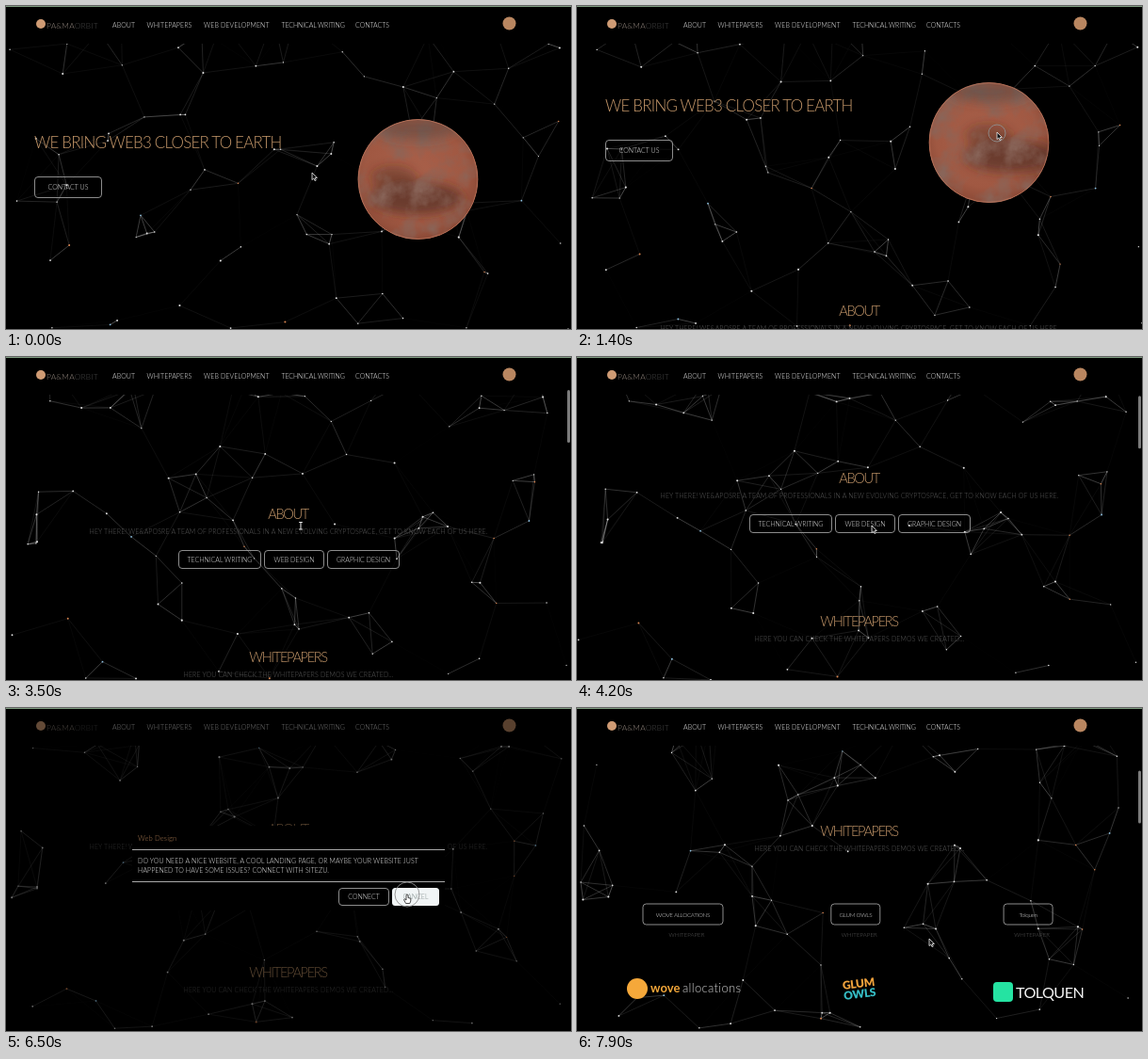
Animation of 600x343 px, one loop 8000 ms. Source, as an HTML page with a canvas:

```html
<!DOCTYPE html>
<html lang="en">
<head>
<meta charset="utf-8">
<title>Web3 landing page</title>
<style>
  html, body { margin: 0; width: 100%; height: 100%; overflow: hidden; background: #000; }
  canvas, svg { position: absolute; left: 0; top: 0; display: block; }
  text { font-family: Lato, "Open Sans", sans-serif; font-weight: 300; white-space: pre; }
  .regular { font-weight: 400; }
  .bold { font-weight: 700; }
  .heavy { font-weight: 900; }
</style>
</head>
<body>
<canvas id="net" width="600" height="343"></canvas>
<svg id="stage" width="600" height="343" viewBox="0 0 600 343"></svg>
<script>
const W = 600, H = 343, LOOP = 8000, STEP = 100;
const GOLD = '#c6986a', PALE = '#e6e6e6', DIM = '#5c5c5c';

// ---------- markup helpers ----------
const text = (x, y, str, size, fill, { anchor = 'start', gap = 0.1, cls = '' } = {}) =>
  `<text x="${x}" y="${y}" font-size="${size}" fill="${fill}" text-anchor="${anchor}" letter-spacing="${gap}" class="${cls}">${str}</text>`;
const centred = (x, y, str, size, fill, gap) => text(x, y, str, size, fill, { anchor: 'middle', gap });
const button = (x, y, w, h, label, size = 7, gap = 0) => `
  <rect x="${x + .5}" y="${y + .5}" width="${w - 1}" height="${h - 1}" rx="3.5" fill="none" stroke="#b0b0b0" stroke-width=".8"/>
  ${centred(x + w / 2, y + h / 2 + 2.5, label, size, PALE, gap)}`;
const heading = (y, str) => centred(299.5, y, str, 14.6, GOLD, -1.35);
const caption = (y, str) => centred(300, y, str, 7, DIM, .13);
const blob = (x, y, rx, ry, fill, opacity) =>
  `<ellipse cx="${x}" cy="${y}" rx="${rx}" ry="${ry}" fill="${fill}" opacity="${opacity}"/>`;

const planet = `
  <g id="planet" transform="translate(437.5 184)" clip-path="url(#disc)">
    <circle r="64" fill="url(#rust)"/>
    <g id="terrain">
      <g filter="url(#soft)">
        ${blob(-2, 20, 50, 17, '#47291f', .6)}
        ${blob(-26, -2, 24, 12, '#47291f', .4)}
      </g>
      <rect x="-140" y="-80" width="240" height="170" filter="url(#grit)"/>
    </g>
    <g filter="url(#soft)">
      ${blob(0, -54, 42, 11, '#544844', .5)}
      <g id="bright">${blob(52, -24, 12, 24, '#dc9a6c', .8)}</g>
    </g>
    <circle id="cap" cx="-4" r="5" fill="#e9d6c8"/>
    <circle r="63.5" fill="none" stroke="#bd765c" opacity=".8"/>
  </g>`;

const samples = ['WOVE ALLOCATIONS', 'GLUM OWLS', 'Tolquen'].map((label, i) => {
  const mid = 112.5 + 183.3 * i, w = i ? 53 : 86;
  return button(mid - w / 2, 591.5, w, 23, label, 6.3, -.3) + centred(mid + 4, 627, 'WHITEPAPER', 6, DIM);
}).join('');

const page = `
  <g id="page">
    ${planet}
    ${text(30, 151, 'WE BRING WEB3 CLOSER TO EARTH', 16.9, GOLD, { gap: -.75 })}
    ${button(30, 181, 72, 23, 'CONTACT US')}
    ${heading(368, 'ABOUT')}
    ${caption(384, 'HEY THERE! WE&amp;APOSRE A TEAM OF PROFESSIONALS IN A NEW EVOLVING CRYPTOSPACE, GET TO KNOW EACH OF US HERE.')}
    ${button(183, 401, 88, 20, 'TECHNICAL WRITING')}
    ${button(274, 401, 64, 20, 'WEB DESIGN')}
    ${button(341, 401, 77, 20, 'GRAPHIC DESIGN')}
    ${heading(520, 'WHITEPAPERS')}
    ${caption(536, 'HERE YOU CAN CHECK THE WHITEPAPERS DEMOS WE CREATED...')}
    ${samples}
    <circle cx="64" cy="682" r="11" fill="#f5a83a"/>
    ${text(78, 686, 'wove', 13, '#f5a83a', { cls: 'bold' })}
    ${text(112, 686, 'allocations', 13, '#d0d0d0', { gap: .3 })}
    <g transform="translate(299.5 682) rotate(-7)" text-anchor="middle">
      ${text(0, -1, 'GLUM', 12, '#f0a23c', { anchor: 'middle', gap: -.3, cls: 'heavy' })}
      ${text(0, 10, 'OWLS', 12, '#35bcc4', { anchor: 'middle', gap: -.3, cls: 'heavy' })}
    </g>
    <rect x="442" y="675" width="21" height="21" rx="4" fill="#25e3a2"/>
    ${text(466, 692, 'TOLQUEN', 16.2, '#f2f2f2', { gap: -.6, cls: 'regular' })}
  </g>`;

const navItem = (x, label, gap) => text(x, 22.7, label, 7, '#f0f0f0', { gap });
const nav = `
  <rect width="600" height="40" fill="#000"/>
  <circle cx="37" cy="19" r="5" fill="#cf9b74"/>
  ${text(43, 23.5, 'PA&amp;MA<tspan fill="#4a4a4a">ORBIT</tspan>', 8.4, '#8c8078', { gap: .2 })}
  ${navItem(113, 'ABOUT')}
  ${navItem(149.5, 'WHITEPAPERS')}
  ${navItem(210, 'WEB DEVELOPMENT')}
  ${navItem(292.5, 'TECHNICAL WRITING', -.1)}
  ${navItem(371, 'CONTACTS', 0)}
  <circle cx="534.5" cy="18.5" r="7" fill="#b98660"/>`;

const dialog = `
  <g id="dialog">
    <rect x="134" y="125" width="332" height="90" fill="#000"/>
    ${text(140, 141, 'Web Design', 7.6, '#a87850')}
    <path d="M134 150.5H466M134 184.5H466" stroke="#bdbdbd" stroke-width=".9"/>
    ${text(140, 164.5, 'DO YOU NEED A NICE WEBSITE, A COOL LANDING PAGE, OR MAYBE YOUR WEBSITE JUST', 7, '#eee')}
    ${text(140, 174.5, 'HAPPENED TO HAVE SOME ISSUES? CONNECT WITH SITEZU.', 7, '#eee')}
    ${button(353, 191, 54, 19, 'CONNECT')}
    ${button(410, 191, 50, 19, 'CANCEL')}
    <g id="hover">
      <rect x="410" y="191" width="50" height="19" rx="3.5" fill="#f1f5f6"/>
      ${centred(435, 203, 'CANCEL', 7, '#7d8a88', 0)}
    </g>
  </g>`;

const stage = document.getElementById('stage');
stage.innerHTML = `
  <defs>
    <radialGradient id="rust" cx=".48" cy=".45" r=".56">
      <stop offset="0" stop-color="#a9604a"/><stop offset=".75" stop-color="#a05842"/>
      <stop offset="1" stop-color="#8a4936"/>
    </radialGradient>
    <clipPath id="disc"><circle r="64"/></clipPath>
    <filter id="soft" x="-50%" y="-50%" width="200%" height="200%"><feGaussianBlur stdDeviation="6"/></filter>
    <filter id="grit" x="0" y="0" width="100%" height="100%">
      <feTurbulence type="fractalNoise" baseFrequency=".035" numOctaves="5" seed="4"/>
      <feColorMatrix values="0 0 0 0 .25  0 0 0 0 .13  0 0 0 0 .1  2.6 0 0 0 -1.08"/>
    </filter>
  </defs>
  ${page}${nav}
  <rect id="bar" x="596" width="3" height="56" rx="1.5" fill="#7c7c7c"/>
  <rect id="shade" width="600" height="343" fill="#000"/>
  ${dialog}
  <rect width="600" height="1" fill="#7f9c80"/>
  <circle id="ring" fill="none" stroke="#8f8f8f" stroke-width=".9"/>
  <g id="cursor" stroke-linejoin="round">
    <path id="arrow" d="M0 0V7.6L1.8 6L3 8.6L4.3 8L3.2 5.5H5.4Z" fill="#111" stroke="#eee" stroke-width=".8"/>
    <path id="beam" d="M-1.8 -3.5H1.8M0 -3.5V4M-1.8 4H1.8" fill="none" stroke="#eee"/>
    <path id="hand" d="M-1 -3.5Q0 -4.5 1 -3.5V-.5L3.8 .3V3L2.8 5.5H-1.4L-3.5 1.6L-2.4 1L-1 2Z" fill="#fff" stroke="#222" stroke-width=".8"/>
  </g>`;

const el = id => document.getElementById(id);
const set = (id, attrs) => { for (const k in attrs) el(id).setAttribute(k, attrs[k]); };
const show = (id, on) => set(id, { display: on ? 'inline' : 'none' });

// ---------- timing ----------
const span = (t, a, b) => Math.max(0, Math.min(1, (t - a) / (b - a)));
const smooth = p => p * p * (3 - 2 * p);
const ease = (t, a, b) => smooth(span(t, a, b));

const scrolls = [
  { from: 200, to: 900, by: 39 },
  { from: 1900, to: 2600, by: 21 },
  { from: 2700, to: 3500, by: 136 },
  { from: 3600, to: 4100, by: 38 },
  { from: 7000, to: 7900, by: 150 }
];
const scrollAt = t => scrolls.reduce((sum, s) => sum + s.by * ease(t, s.from, s.to), 0);
const barAlpha = t => Math.max(...scrolls.map(s => t < s.from ? 0 : 1 - span(t, s.to + 200, s.to + 400)));

const glides = [
  { from: 400, to: 1200, x: 446, y: 134 },
  { from: 1600, to: 2500, x: 313, y: 179 },
  { from: 5400, to: 6200, x: 426, y: 202 },
  { from: 6800, to: 7500, x: 374, y: 245 }
];
const cursorAt = t => glides.reduce(([x, y], g) => {
  const p = ease(t, g.from, g.to);
  return [x + (g.x - x) * p, y + (g.y - y) * p];
}, [325, 177]);

// ---------- particle network ----------
const LINK = 72, COLS = 12, ROWS = 7;
let seed = 23;
const rnd = () => (seed = seed * 16807 % 2147483647) / 2147483647;
for (let i = 0; i < 9; i++) rnd();

// One particle per loosely jittered grid cell, each drifting at a constant speed.
const particles = Array.from({ length: COLS * ROWS }, (_, i) => {
  const angle = rnd() * 2 * Math.PI, speed = 4 + 10 * rnd(), hue = rnd();
  return {
    x: (i % COLS + .5 + 1.5 * (rnd() - .5)) * W / COLS,
    y: (Math.floor(i / COLS) + .5 + 1.5 * (rnd() - .5)) * H / ROWS,
    vx: speed * Math.cos(angle),
    vy: speed * Math.sin(angle),
    r: .6 + .45 * rnd(),
    color: hue < .1 ? '#dc8650' : hue < .13 ? '#8fc4e6' : '#e4e4e4'
  };
});
const bounce = (v, max) => max - Math.abs(max - (v % (2 * max) + 2 * max) % (2 * max));

const ctx = el('net').getContext('2d');
ctx.lineWidth = .65;

function drawNetwork(sec) {
  ctx.clearRect(0, 0, W, H);
  const points = particles.map(p => [bounce(p.x + p.vx * sec, W), bounce(p.y + p.vy * sec, H)]);
  points.forEach(([x, y], i) => {
    for (const [u, v] of points.slice(i + 1)) {
      const near = 1 - Math.hypot(u - x, v - y) / LINK;
      if (near <= 0) continue;
      ctx.strokeStyle = `rgba(255,255,255,${.55 * near})`;
      ctx.beginPath();
      ctx.moveTo(x, y);
      ctx.lineTo(u, v);
      ctx.stroke();
    }
  });
  points.forEach(([x, y], i) => {
    ctx.fillStyle = particles[i].color;
    ctx.beginPath();
    ctx.arc(x, y, particles[i].r, 0, 2 * Math.PI);
    ctx.fill();
  });
}

// ---------- frame ----------
function render(t) {
  drawNetwork(t / 1000);

  const scroll = scrollAt(t);
  set('page', { transform: `translate(0 ${-scroll})` });
  set('bar', { y: 2 + scroll * .168, opacity: barAlpha(t) });

  const turned = ease(t, 1700, 2600);
  show('planet', scroll < 185);
  set('terrain', { transform: `translate(${t * .018} ${-t * .004})` });
  set('bright', { opacity: turned });
  set('cap', { opacity: turned, cy: 46 - 12 * turned });

  const closing = span(t, 6600, 6800);
  const drop = -25 * (1 - span(t, 5050, 5250)) ** 2 - 14 * closing;
  show('dialog', t >= 5050 && closing < 1);
  set('dialog', { opacity: span(t, 5000, 5200) * (1 - closing), transform: `translate(0 ${drop})` });
  set('shade', { opacity: .52 * span(t, 4950, 5100) * (1 - span(t, 6700, 6900)) });

  const [x, y] = cursorAt(t);
  const beam = t >= 3100 && t < 3700;
  const hand = t >= 6100 && t < 6800;
  set('cursor', { transform: `translate(${x} ${y})` });
  show('beam', beam);
  show('hand', hand);
  show('hover', hand);
  show('arrow', !beam && !hand);

  const dragging = t >= 1200 && t < 1500;
  const pressing = (t >= 4900 && t < 5000) || (t >= 6400 && t < 6700);
  show('ring', dragging || pressing);
  set('ring', { cx: x, cy: hand ? y - 4 : y + 1, r: dragging ? 9 : 13 });
}

const start = performance.now();
function tick(now) {
  const t = Math.max(0, now - start) % LOOP;
  render(Math.floor(t / STEP) * STEP);
  requestAnimationFrame(tick);
}
render(0);
requestAnimationFrame(tick);
</script>
</body>
</html>
```
